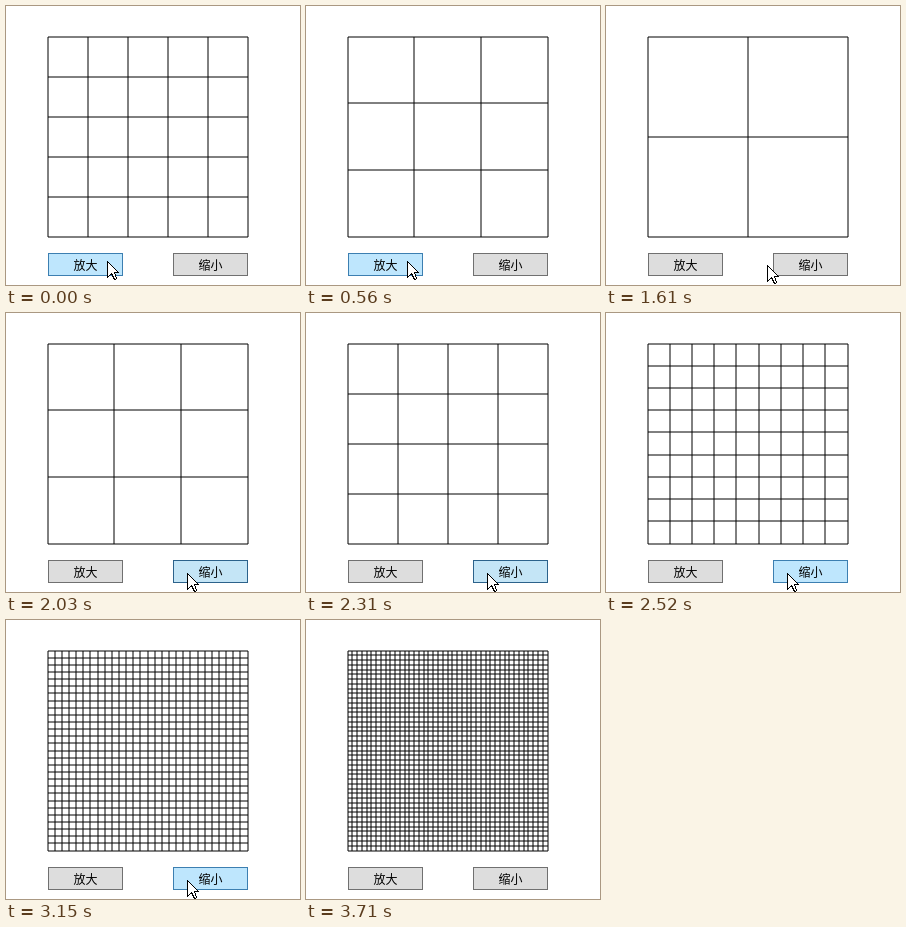
An HTML page with a canvas that plays this animation: 294 by 279 pixels, repeating every 4.13 s.

```html
<!DOCTYPE html>
<html lang="zh-CN">
<head>
<meta charset="utf-8">
<style>
html, body { margin: 0; width: 100%; height: 100%; overflow: hidden; background: #fff; }
canvas, svg, .btn { position: absolute; }
canvas { left: 41px; top: 30px; }
svg { left: 0; top: 0; }
.btn {
  top: 247px; width: 75px; height: 23px; box-sizing: border-box;
  border: 1px solid #707070; background: #ddd; color: #000;
  font: 12px/21px "Noto Sans CJK SC", "Noto Sans CJK", sans-serif; text-align: center;
}
.hover { background: #bee6fd; border-color: #3c7fb1; }
.pressed { background: #c4e5f6; border-color: #2c628b; }
</style>
</head>
<body>
<canvas id="grid" width="202" height="202"></canvas>
<div class="btn" style="left:42px">放大</div>
<div class="btn" style="left:167px">缩小</div>
<svg id="cursor" width="13" height="20" shape-rendering="crispEdges">
  <path d="M.5 .5V16.5L4.5 12.5L7.5 18.5H8.5L9.5 17.5L7.5 11.5H11.5Z" fill="#fff" stroke="#000"/>
</svg>
<script>
const TICK = 70, TICKS = 59, SIZE = 200;
// Ticks at which the mouse is released; it is pressed one tick earlier.
const buttons = [
  { left: 42, clicks: [1, 10, 17], zoom: n => Math.max(2, Math.floor(n * 2 / 3)) },
  { left: 167, clicks: [26, 30, 34, 36, 38, 41, 45, 50], zoom: n => Math.floor(n * 1.5) }
];
const boxes = document.querySelectorAll('.btn');
const cursor = document.getElementById('cursor');
const ctx = document.getElementById('grid').getContext('2d');
ctx.translate(1, 1);
let lastTick = -1;

function cellsAt(tick) {
  let n = 5;
  for (const { clicks, zoom } of buttons)
    for (const click of clicks) if (click <= tick) n = zoom(n);
  return n;
}

// Lines are centred on whole coordinates, so each one softly covers two pixels.
function drawGrid(n) {
  const line = (...ends) => {
    ctx.beginPath();
    ctx.moveTo(ends[0], ends[1]);
    ctx.lineTo(ends[2], ends[3]);
    ctx.stroke();
  };
  ctx.clearRect(-1, -1, SIZE + 2, SIZE + 2);
  for (let i = 0; i <= n; i++) {
    const p = Math.floor(i * SIZE / n);
    line(p, 0, p, SIZE);
    line(0, p, SIZE, p);
  }
}

// The pointer crosses to the second button, then drops off the stage.
function pointerAt(tick) {
  const across = Math.min(1, Math.max(0, (tick - 20) / 4));
  const drop = Math.max(0, tick - 51);
  return [101 + 80 * across, 255 + 5 * across + 12 * drop];
}

function render(tick) {
  const [x, y] = pointerAt(tick);
  cursor.style.transform = `translate(${x}px, ${Math.round(y)}px)`;
  drawGrid(cellsAt(tick));
  buttons.forEach(({ left, clicks }, i) => {
    const over = x >= left && x < left + 75 && y < 270;
    const down = clicks.includes(tick + 1) && tick > 0;
    boxes[i].className = 'btn' + (down ? ' pressed' : over ? ' hover' : '');
  });
}

const start = performance.now();
function frame() {
  const tick = Math.floor((performance.now() - start) / TICK) % TICKS;
  if (tick !== lastTick) render(lastTick = tick);
  requestAnimationFrame(frame);
}
frame();
</script>
</body>
</html>
```
